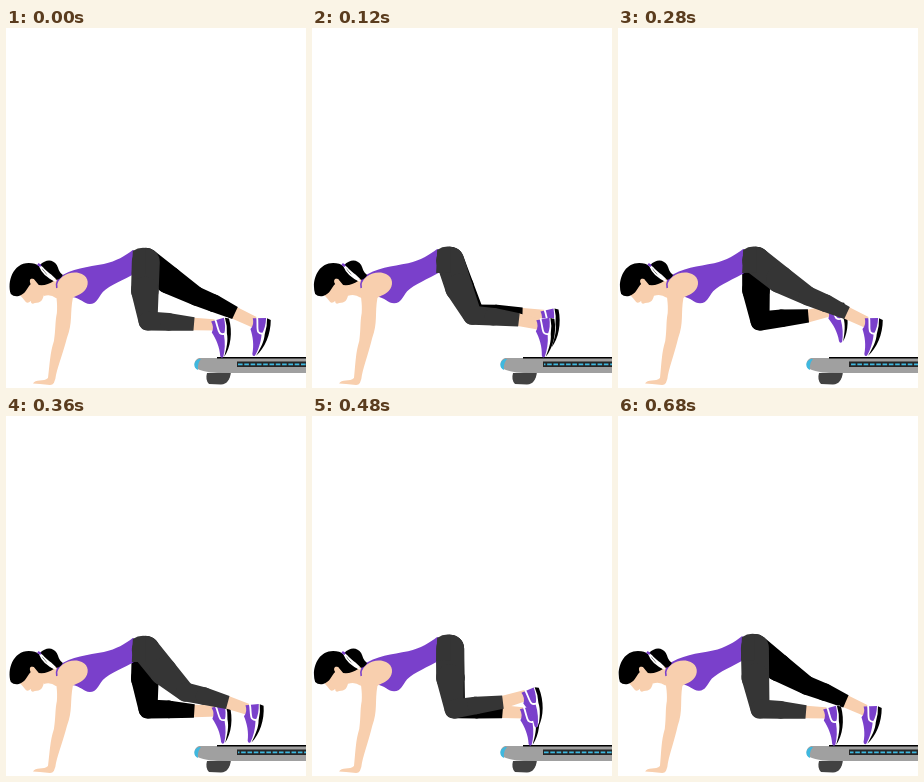
These frames come from a looping animation (300x360 px, 720 ms). An HTML page with a canvas:

```html
<!DOCTYPE html>
<html lang="en">
<head>
<meta charset="utf-8">
<title>Treadmill climber</title>
<style>
html, body { margin: 0; width: 100%; height: 100%; overflow: hidden; background: #fff; }
canvas { display: block; }
</style>
</head>
<body>
<canvas id="stage" width="300" height="360"></canvas>
<script>
const ctx = document.getElementById('stage').getContext('2d');
const LOOP = 720, STEP = 40, FAR_DELAY = 440;
const PURPLE = '#7a40cb', SKIN = '#f8cfae', GREY = '#353535', BLACK = '#000', WHITE = '#fff';
const BLUE = '#3eb8df', METAL = '#a0a0a0';

const progress = (t, from, to) => Math.max(0, Math.min(1, (t - from) / (to - from)));
const ease = (t, from, to) => (1 - Math.cos(Math.PI * progress(t, from, to))) / 2;

// The belt drags the leg back, then it lifts and swings forward again.
function gait(t) {
  const extend = ease(t, 10, 270) - ease(t, 305, 480);
  const drag = extend ** .8, raise = extend ** 1.5;
  const lift = Math.sin(Math.PI * progress(t, 350, 650));
  return {
    knee: { x: 142 + 48 * extend, y: 293 - 25 * raise },
    ankle: { x: 188 + 41 * drag + 3 * lift, y: 296 - 11 * extend - 10 * lift },
    heel: { x: 213 + 42 * drag + 4 * lift, y: 291 - extend - 18 * lift },
    tilt: -.06 + .27 * extend - .12 * lift
  };
}

// The body rocks twice per loop and rests before the loop restarts.
function bodySway(t) {
  const dx = -1.6 + 1.5 * Math.cos(4 * Math.PI * (Math.min(t, 560) - 20) / LOOP);
  return { dx, dy: dx * .65 };
}

function fill(color, path) {
  ctx.fillStyle = color;
  ctx.fill(new Path2D(path));
}

function line(color, width, path) {
  ctx.strokeStyle = color;
  ctx.lineWidth = width;
  ctx.stroke(new Path2D(path));
}

// Tapered limb with a round start and a round or flat end.
function limb(color, p, r0, q, r1, flat) {
  const a = Math.atan2(q.y - p.y, q.x - p.x);
  const lean = Math.acos(Math.max(-1, Math.min(1, (r0 - r1) / Math.hypot(q.x - p.x, q.y - p.y))));
  ctx.fillStyle = color;
  ctx.beginPath();
  ctx.arc(p.x, p.y, r0, a + lean, a - lean + 2 * Math.PI);
  if (flat) {
    ctx.lineTo(q.x + r1 * Math.sin(a), q.y - r1 * Math.cos(a));
    ctx.lineTo(q.x - r1 * Math.sin(a), q.y + r1 * Math.cos(a));
  } else {
    ctx.arc(q.x, q.y, r1, a - lean, a + lean);
  }
  ctx.fill();
}

// Point between two joints, pushed towards the front of the leg.
function muscle(p, q, share, front) {
  const dx = q.x - p.x, dy = q.y - p.y, size = Math.hypot(dx, dy);
  return { x: p.x + dx * share - dy / size * front, y: p.y + dy * share + dx / size * front };
}

function shoe(heel, tilt) {
  ctx.save();
  ctx.translate(heel.x, heel.y);
  ctx.rotate(tilt);
  fill(WHITE, 'M-4 0 L9 -1 C11 14 9 28 2 38 L0 38 C0 28 -4 20 -6 13Z');
  fill(PURPLE, 'M-8 2 L5 -1 C6 5 6 11 4 16 C5 24 4 32 2 38 Q0 40 -1 37 C-1 28 -4 20 -8 13 Q-5 8 -8 2Z');
  line(WHITE, 1.8, 'M-4 0 C-2 5 -2 11 0 14 Q2 16 5 15');
  fill(BLACK, 'M6 -1 L10 0 C13 14 10 29 3 38 C6 29 8 22 7 15 Q8 7 6 -1Z');
  ctx.restore();
}

function leg(color, t, hip) {
  const { knee, ankle, heel, tilt } = gait((t + LOOP) % LOOP);
  const thigh = muscle(hip, knee, .48, 2), calf = muscle(knee, ankle, .45, -.5);
  limb(SKIN, ankle, 6.3, { x: heel.x - 3, y: heel.y + 6 }, 5.5);
  shoe(heel, tilt);
  limb(color, hip, 14, thigh, 13.8);
  limb(color, thigh, 13.8, knee, 9.5);
  limb(color, knee, 9.5, calf, 8.8);
  limb(color, calf, 8.8, ankle, 6.7, true);
}

function treadmill(t) {
  fill('#424242', 'M201 345 L225 344 C224 352 221 356 215 356.5 L203 356 Q199 352 201 345Z');
  fill(METAL, 'M193 330 H300 V345 H226 C212 345 203 345 194 342 C187 340 187 332 193 330Z');
  fill(BLUE, 'M193 331 C187 333 187 340 192 342 Q191 336 195 331Z');
  fill(BLACK, 'M211 329 H300 V330.5 H211Z');
  fill('#262626', 'M231 333.5 H300 V339 H231Z');
  ctx.save();
  ctx.setLineDash([4.6, 1.7]);
  ctx.lineDashOffset = -6.3 * 3 * t / LOOP;
  line(BLUE, 1.8, 'M232 336.3 H300');
  ctx.restore();
}

function torso() {
  fill(SKIN, 'M36 258 L50 251 L60 247 L62 272 L50 270 Q45 266 38 268Z');
  fill(PURPLE, 'M52 250 C66 240 82 239 98 236 C111 233 119 228 127 222 L130 223 L130 245 C118 252 104 257 97 264 C92 270 91 276 84 276 C78 276 75 270 66 269 L51 261Z');
}

function head() {
  fill(SKIN, 'M13 258 L14 267 Q17 270 20 274 Q22 276 25 273 Q25 277 29 275 C35 275 37 272 38 267 L47 263 L46 250 L24 246Z');
  fill(BLACK, 'M5 266 C1 254 7 235 23 235 C32 235 36 240 40 245 Q44 251 48 253 Q41 258 33 257 L28 251 Q23 250 25 256 C21 260 20 266 13 268 Q8 269 5 266Z');
  fill(SKIN, 'M25 256 C22 251 27 249 29 253 Q32 257 30 259Z');
  fill(BLACK, 'M34 237 C40 231 47 231 51 237 C53 241 53 244 57 247 Q55 251 51 252 C46 246 41 244 37 239Z');
  line(WHITE, 1.8, 'M34 238 C37 246 43 250 50 253');
  line(PURPLE, 2.5, 'M32 236 L35 238');
}

function arm() {
  fill(SKIN, 'M50 260 C52 249 63 243 73 245 C82 247 84 255 80 261 C76 267 70 267 67 270 C64 285 67 295 61 310 C57 325 53 335 50 347 Q49 357 44 357 L34 356 L27 355.5 C29 351 38 354 42 350 C44 335 44 325 48 313 C50 300 49 295 51 285 C52 275 50 268 50 260Z');
  line(PURPLE, 1.6, 'M52 252 Q50 256 51 260');
}

function transformed(matrix, paint) {
  ctx.save();
  ctx.transform(...matrix);
  paint();
  ctx.restore();
}

function draw(t) {
  const { dx, dy } = bodySway(t);
  const hip = { x: 140 + dx, y: 234 + dy };
  // The hips bob, the head only slides, and the hand stays planted.
  const bob = [1, dy / 140, 0, 1, dx, 0];
  const slide = [1, 0, 0, 1, dx, 0];
  const planted = [1, 0, -dx / 95, 1, dx * 351 / 95, 0];
  ctx.fillStyle = WHITE;
  ctx.fillRect(0, 0, 300, 360);
  treadmill(t);
  leg(BLACK, t - FAR_DELAY, hip);
  transformed(bob, torso);
  leg(GREY, t, hip);
  transformed(bob, () => fill(GREY, 'M127 223 Q133 219 140 220 L140 246 L126 246Z'));
  transformed(slide, head);
  transformed(planted, arm);
}

function tick(now) {
  draw(Math.floor(now % LOOP / STEP) * STEP);
  requestAnimationFrame(tick);
}

draw(0);
requestAnimationFrame(tick);
</script>
</body>
</html>
```
